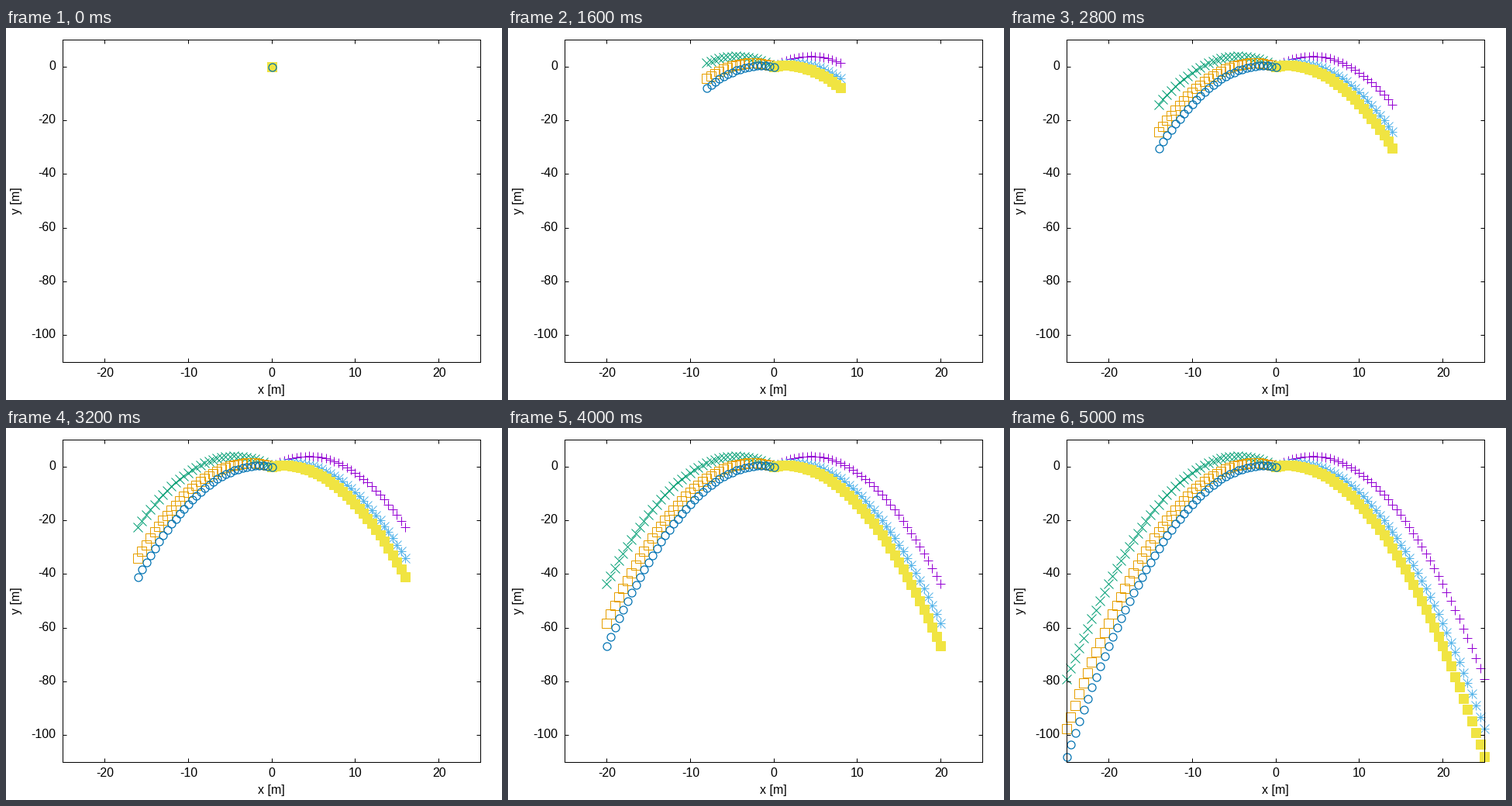
A matplotlib script that plays this animation: 640 px wide and 480 px high, repeating every 5100 ms.

```python
import numpy as np
import matplotlib.pyplot as plt
from matplotlib.animation import FuncAnimation
from matplotlib.markers import MarkerStyle
from matplotlib.transforms import Affine2D

W, H, DPI = 640, 480, 100
PX = 72 / DPI  # one pixel in points
LEFT, RIGHT, TOP, BOTTOM = 73, 612, 15, 431
XMIN, XMAX, YMIN, YMAX = -25, 25, -110, 10
FRAMES, INTERVAL = 51, 100
G, SPEED_X, DT = 9.8, 5.0, 0.1

plt.rcParams["font.family"] = "Liberation Sans"
plt.rcParams["toolbar"] = "None"

fig = plt.figure(figsize=(W / DPI, H / DPI), dpi=DPI, facecolor="white")
ax = fig.add_axes([LEFT / W, 1 - BOTTOM / H,
                   (RIGHT - LEFT) / W, (BOTTOM - TOP) / H])
ax.set_xlim(XMIN, XMAX)
ax.set_ylim(YMIN, YMAX)
ax.set_axisbelow(False)

x_ticks = range(-20, 21, 10)
y_ticks = range(-100, 1, 20)
ax.set_xticks(x_ticks)
ax.set_yticks(y_ticks)
ax.tick_params(direction="in", length=5 * PX, width=PX, top=True, right=True,
               labelbottom=False, labelleft=False)
for spine in ax.spines.values():
    spine.set_linewidth(PX)


def label(x, y, text, ha="center", rotation=0):
    """Write text with its baseline at pixel (x, y), measured from top left."""
    fig.text(x / W, 1 - y / H, text, ha=ha, va="baseline", fontsize=16 * PX,
             rotation=rotation, rotation_mode="anchor")


for v in x_ticks:
    px = LEFT + (v - XMIN) / (XMAX - XMIN) * (RIGHT - LEFT)
    label(px + 0.7, 450, str(v))
for v in y_ticks:
    py = TOP + (YMAX - v) / (YMAX - YMIN) * (BOTTOM - TOP)
    label(64.5, round(py) + 4, str(v), ha="right")
label(342.5, 472, "x [m]")
label(18, 223, "y [m]", rotation=90)

# Circles are not snapped, so centre them on the pixel like the other markers.
RING = 10
ring = MarkerStyle("o", transform=Affine2D().translate(0.5 / RING, -0.5 / RING))

# marker, colour, fill, size and line width in pixels, direction, launch angle
SERIES = [
    ("+", "#9400d3", "none", 12, 1, 1, 60),
    ("x", "#009e73", "none", 12, 1, -1, 60),
    ("+", "#56b4e9", "none", 12, 1, 1, 45),
    ("x", "#56b4e9", "none", 12, 1, 1, 45),
    ("s", "#e69f00", "none", 12, 1, -1, 45),
    ("s", "#f0e442", "#f0e442", 12, 1, 1, 30),
    (ring, "#0072b2", "none", RING, 1.25, -1, 30),
]

t = DT * np.arange(FRAMES)
trails = []
for marker, color, fill, size, width, side, angle in SERIES:
    x = side * SPEED_X * t
    y = SPEED_X * np.tan(np.radians(angle)) * t - G * t**2 / 2
    line, = ax.plot([], [], linestyle="none", marker=marker,
                    markersize=size * PX, markeredgewidth=width * PX,
                    markeredgecolor=color, markerfacecolor=fill,
                    clip_on=False)
    trails.append((line, x, y))


def update(i):
    for line, x, y in trails:
        line.set_data(x[:i + 1], y[:i + 1])
    return [line for line, _, _ in trails]


anim = FuncAnimation(fig, update, frames=FRAMES, interval=INTERVAL,
                     repeat=True, repeat_delay=0, blit=False)
plt.show()
```
